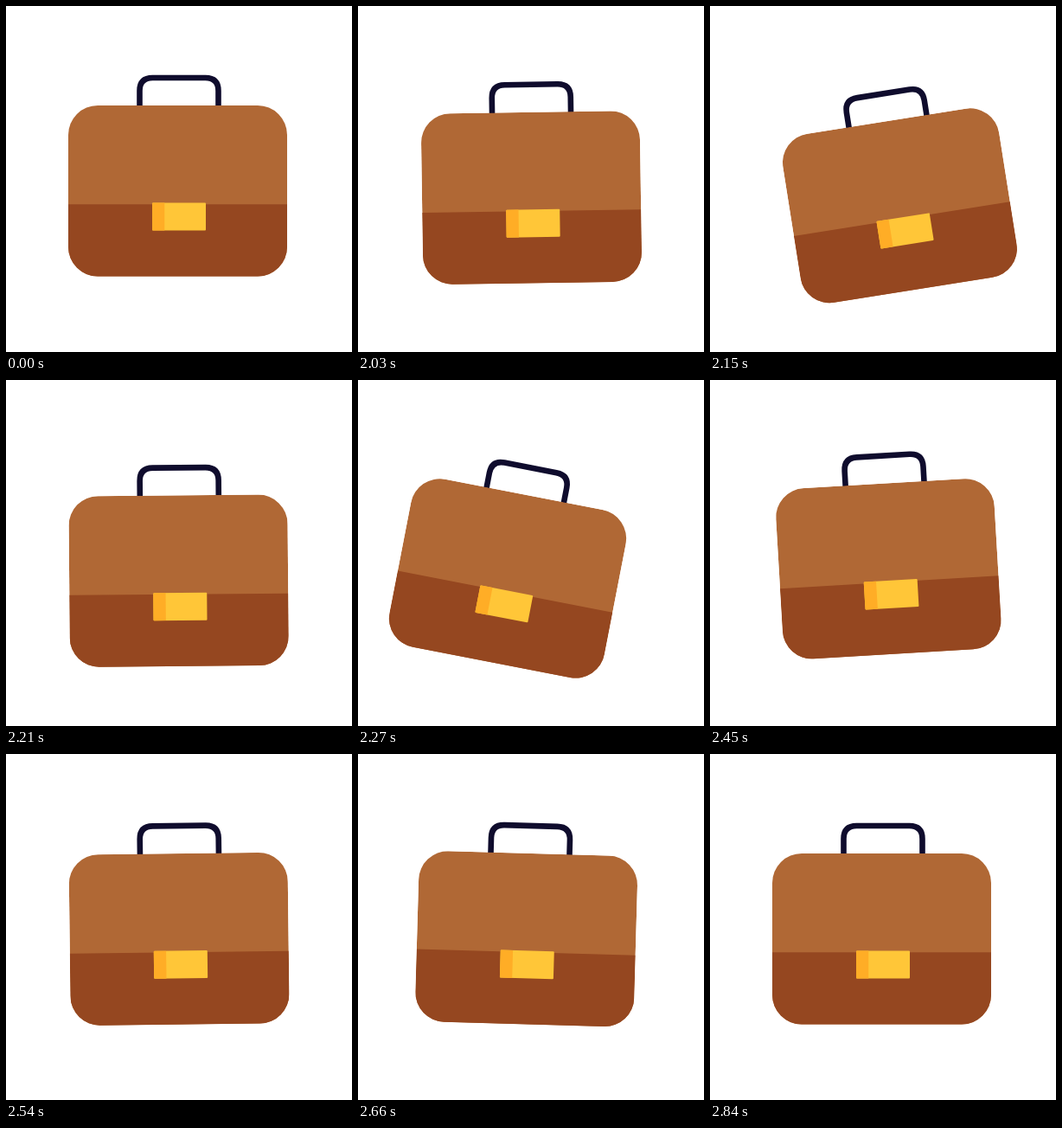
These frames come from a looping animation (400 px wide and 400 px high, 2.87 s). An HTML page:

```html
<!DOCTYPE html>
<html lang="en">
<head>
<meta charset="utf-8">
<title>Swinging briefcase</title>
<style>
  html, body { margin: 0; width: 100%; height: 100%; overflow: hidden; background: #fff; }
  svg { display: block; width: 100vw; height: 100vh; }
</style>
</head>
<body>
<svg viewBox="0 0 400 400">
  <clipPath id="body"><rect x="72" y="115" width="253" height="197.5" rx="34"/></clipPath>
  <g id="bag">
    <path d="M154.5 116V98Q154.5 83 169.5 83H230.5Q245.5 83 245.5 98V116"
          fill="none" stroke="#0f0c2d" stroke-width="6.6"/>
    <g clip-path="url(#body)">
      <rect x="72" y="115" width="253" height="198" fill="#b06835"/>
      <rect x="72" y="229.3" width="253" height="84" fill="#954720"/>
    </g>
    <rect x="169" y="227.5" width="62" height="32" rx="1" fill="#ffc638"/>
    <path d="M183.3 227.5H170Q169 227.5 169 228.5V258.5Q169 259.5 170 259.5H183.3Z" fill="#ffad26"/>
  </g>
</svg>
<script>
const LOOP = 2870, START = 2030, STEP = 30, END = 2840;
const bag = document.getElementById('bag');

const sine = f => (1 - Math.cos(Math.PI * f)) / 2;
const quadOut = f => f * (2 - f);

// [time, value, easing towards this value]
const swing = [[2000, 0], [2150, -9], [2285, 11.6], [2484, -4.5], [2585, 2], [2850, 0]];
const drop = [[2000, 0], [2125, 18.4, quadOut], [2310, 18.4], [2520, 0]];

function valueAt(keys, t) {
  const i = keys.findIndex(k => k[0] > t);
  if (i === 0) return keys[0][1];
  if (i < 0) return keys[keys.length - 1][1];
  const [t0, v0] = keys[i - 1], [t1, v1, ease = sine] = keys[i];
  return v0 + (v1 - v0) * ease((t - t0) / (t1 - t0));
}

function draw(now) {
  const t = now % LOOP;
  let angle = 0, y = 0;
  if (t >= START && t < END) {
    const held = START + Math.floor((t - START) / STEP) * STEP;
    angle = valueAt(swing, held);
    y = valueAt(drop, held);
  }
  bag.setAttribute('transform', `translate(0 ${y}) rotate(${angle} 200 80)`);
}

const begin = performance.now();
function tick() {
  draw(performance.now() - begin);
  requestAnimationFrame(tick);
}
tick();
</script>
</body>
</html>
```
